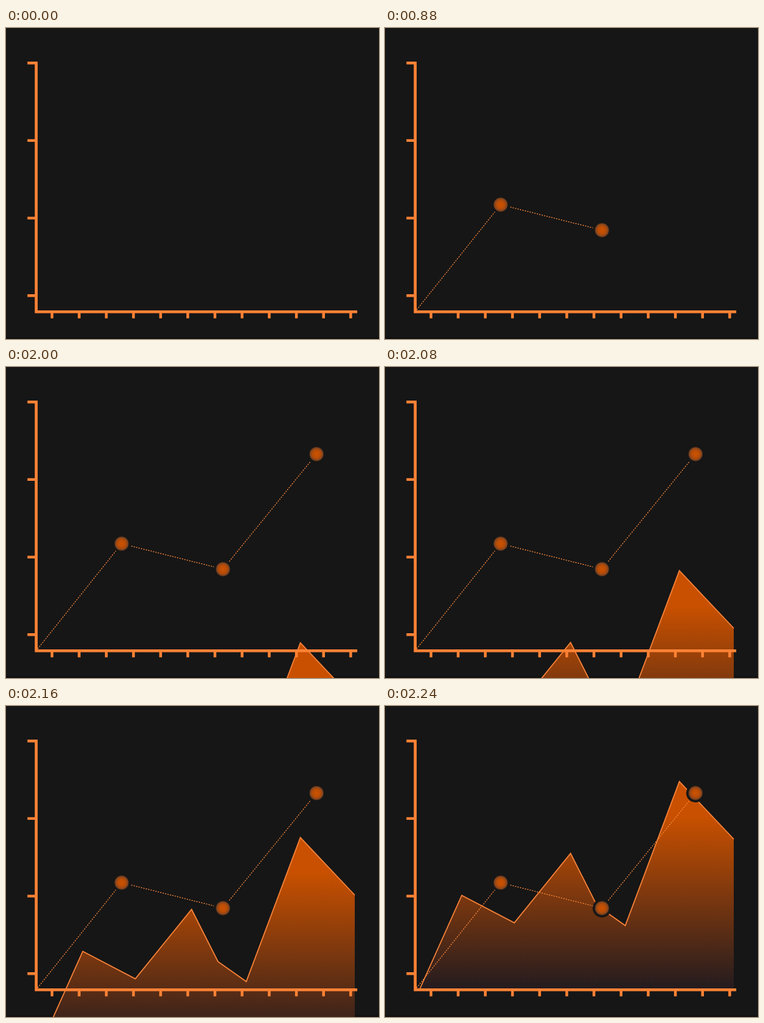
An HTML page that plays this animation: 600 by 500 pixels, repeating every 7.44 s.

```html
<!DOCTYPE html>
<html lang="en">
<head>
<meta charset="utf-8">
<title>Line and area chart</title>
<style>
  html, body { margin: 0; width: 100%; height: 100%; overflow: hidden; background: #161616; }
  svg { display: block; width: 100%; height: 100%; }
</style>
</head>
<body>
<svg viewBox="0 0 600 500" xmlns="http://www.w3.org/2000/svg">
  <defs>
    <linearGradient id="fade" gradientUnits="userSpaceOnUse" x1="0" y1="121" x2="0" y2="456">
      <stop offset=".17" stop-color="#c85000"/>
      <stop offset="1" stop-color="#231b1f"/>
    </linearGradient>
    <radialGradient id="glow">
      <stop offset="0" stop-color="#cc5200"/>
      <stop offset=".5" stop-color="#bb4d06"/>
      <stop offset=".84" stop-color="#82441f"/>
      <stop offset="1" stop-color="#82441f" stop-opacity="0"/>
    </radialGradient>
  </defs>
  <rect width="600" height="500" fill="#161616"/>
  <rect y="497" width="600" height="3" fill="#111"/>
  <g id="area">
    <path id="fill" fill="url(#fade)"/>
    <path id="edge" fill="none" stroke="#f58138" stroke-width="1.8"/>
  </g>
  <g id="lines" fill="none" stroke="#ff8a3c" stroke-width="1.3" stroke-dasharray="2 2"/>
  <g id="dots"/>
  <g fill="none" stroke="#ff8235">
    <path stroke-width="4.6" d="M48.6 54V456.3H565"/>
    <path id="ticks" stroke-width="4.4"/>
  </g>
</svg>
<script>
const LOOP = 7440, STEP = 40, RISE_AT = 2000;
const nodes = [
  { x: 186, y: 284, at: 360 },
  { x: 349, y: 325, at: 880 },
  { x: 499.5, y: 140, at: 1360 }
];
const ridge = 'M55.5 456L123.5 304.5 208 348.5 298.5 237 341 321 386.5 353 473.5 121.5 561 214';

const get = id => document.getElementById(id);
function add(parent, tag, attrs) {
  const el = document.createElementNS('http://www.w3.org/2000/svg', tag);
  for (const key in attrs) el.setAttribute(key, attrs[key]);
  return parent.appendChild(el);
}

get('edge').setAttribute('d', ridge);
get('fill').setAttribute('d', ridge + 'V456Z');

let ticks = '';
for (let i = 0; i < 4; i++) ticks += `M34.5 ${56.2 + i * 124.7}H48`;
for (let i = 0; i < 12; i++) ticks += `M${74 + i * 43.68} 457V466.8`;
get('ticks').setAttribute('d', ticks);

let from = { x: 51, y: 453 };
for (const node of nodes) {
  const line = add(get('lines'), 'path', { d: `M${from.x} ${from.y}L${node.x} ${node.y}` });
  const dot = add(get('dots'), 'g', { transform: `translate(${node.x} ${node.y})` });
  add(dot, 'circle', { r: 15, fill: '#161616' });
  add(dot, 'circle', { r: 12, fill: 'url(#glow)' });
  node.parts = [line, dot];
  from = node;
}

const show = (el, on) => el.setAttribute('visibility', on ? 'visible' : 'hidden');

function draw(t) {
  for (const { at, parts } of nodes) parts.forEach(el => show(el, t >= at));
  // The area climbs 58px per step and stops on the axis.
  const step = Math.floor((t - RISE_AT) / STEP);
  show(get('area'), step >= 0);
  get('area').setAttribute('transform', `translate(0 ${Math.max(0, 322 - 58 * step)})`);
}

const start = performance.now();
function tick(now) {
  draw(Math.max(0, now - start) % LOOP);
  requestAnimationFrame(tick);
}
draw(0);
requestAnimationFrame(tick);
</script>
</body>
</html>
```
